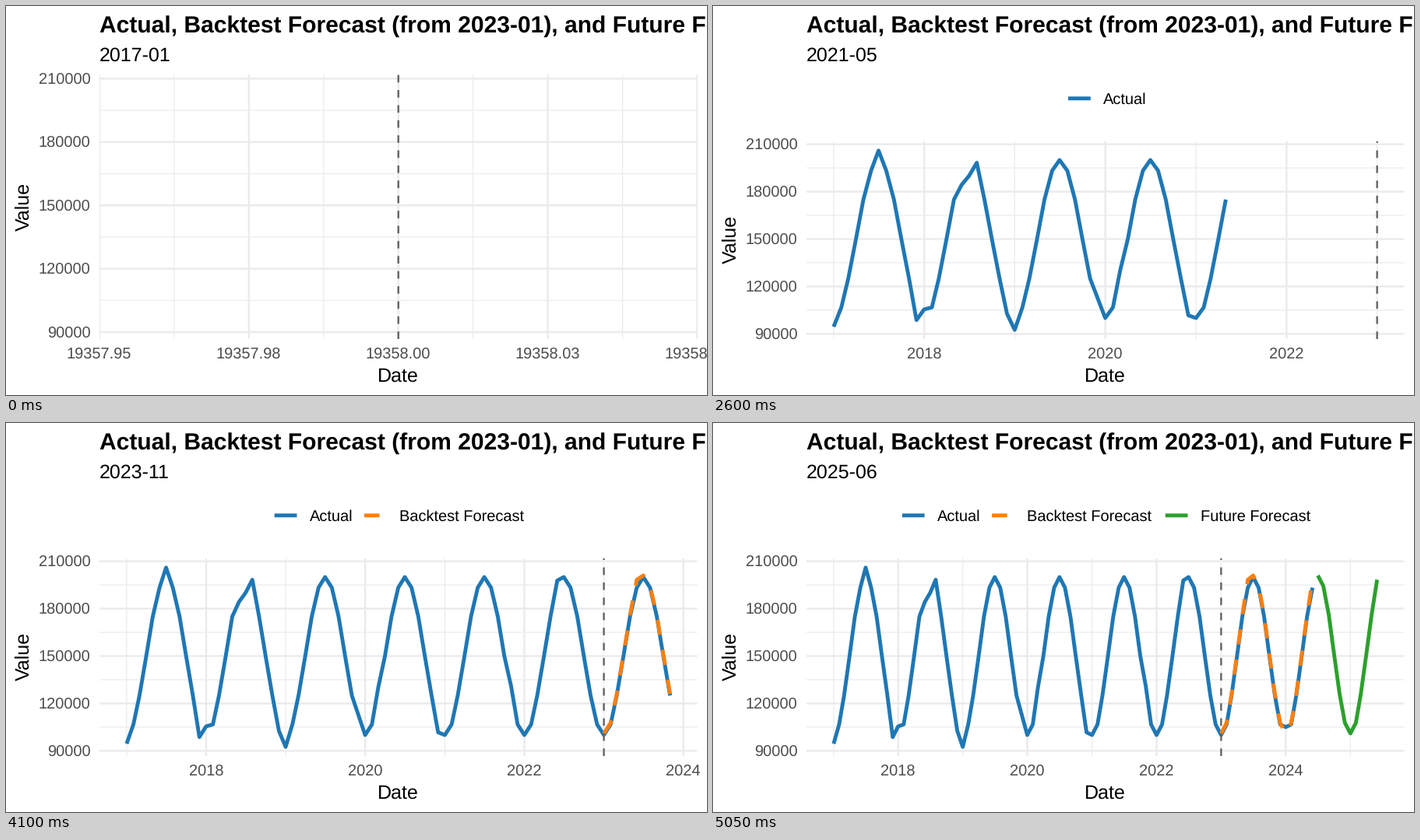
Write a matplotlib script that moves like this. It is 900x500 px and loops after 5100 ms.

```python
import matplotlib.pyplot as plt
import numpy as np
from matplotlib.animation import FuncAnimation
from matplotlib.patches import Rectangle
from matplotlib.textpath import TextPath

plt.rcParams.update({"font.family": "Liberation Sans", "text.hinting": "none"})

W, H, DPI = 900, 500, 100
PT = 72 / DPI                       # points per pixel
LEFT, RIGHT, BOTTOM = 120, 887.5, 428
MID = (LEFT + RIGHT) / 2
Y_MIN, Y_MAX = 86740, 211860
GRID, AXIS = "#EBEBEB", "#4D4D4D"
LINE, RULE, MAJOR, MINOR = 4.89, 2.424, 2.424, 1.212
KEY, GAP = 36, 12.5                 # legend key width and spacing
DASH = (0, (4, 4))

MONTHS = np.arange("2017-01", "2025-07", dtype="datetime64[M]")
DAYS = MONTHS.astype("datetime64[D]").astype(int)
N = len(MONTHS)
SPLIT, END = 72, 90                 # backtest start, first month without data

# a yearly wave; the measured data strays from it in a few months
wave = 150 - 50 * np.cos(np.arange(N) * np.pi / 6)
STRAY = {
    "2017-01": -5.5, "2017-07": 6, "2017-12": -8, "2018-01": 5.5,
    "2018-06": -9, "2018-07": -10, "2018-08": 5, "2018-12": -4,
    "2019-01": -7.5, "2019-12": 6, "2020-03": 5, "2020-12": -5,
    "2021-11": 6, "2022-06": 4.5, "2024-01": 5,
}
actual = wave + [STRAY.get(str(m), 0) for m in MONTHS]
forecast = wave + 1 + 4 * (np.arange(N) % 12 == 5)

# label, colour, line style, months covered, values in thousands
SERIES = [
    ("Actual", "#1F77B4", "-", 0, END, actual),
    ("Backtest Forecast", "#FF7F0E", DASH, SPLIT, END, forecast),
    ("Future Forecast", "#2CA02C", "-", END, N, forecast),
]

fig = plt.figure(figsize=(W / DPI, H / DPI), dpi=DPI, facecolor="white")
ax = fig.add_axes([0, 0, 1, 1])


def advance(s, size):
    box = TextPath((0, 0), s, size=size).get_extents()
    return box.x0 + box.x1


def text(x, y, s, size, align=0, color="black", rotation=0, **kw):
    """Draw s with its pen width aligned: 0 left, 0.5 centre, 1 right."""
    shift = align * advance(s, size) if align else 0
    if rotation:
        y += shift
    else:
        x -= shift
    ax.text(x, y, s, fontsize=size * PT, ha="left", va="baseline", color=color,
            rotation=rotation, rotation_mode="anchor", **kw)


def line(xs, ys, color, width, style="-", clip=None):
    ln, = ax.plot(xs, ys, color=color, lw=width * PT, ls=style, snap=False,
                  solid_capstyle="butt", dash_capstyle="butt",
                  solid_joinstyle="round", dash_joinstyle="round")
    if clip is not None:
        ln.set_clip_path(clip)


def legend(shown):
    widths = [KEY + GAP + advance(s[0], 20) for s in shown]
    x = MID - (sum(widths) + GAP * (len(shown) - 1)) / 2
    for (label, color, style, *_), width in zip(shown, widths):
        line([x + 0.1 * KEY, x + 0.9 * KEY], [118.8, 118.8], color, LINE, style)
        text(x + KEY + GAP, 126, label, 20)
        x += width + GAP


def draw(i):
    ax.clear()
    ax.set(xlim=(0, W), ylim=(H, 0))
    ax.axis("off")

    # a series needs two points before it appears
    shown = [s for s in SERIES if i > s[3]]
    top = 173.9 if shown else 88.3
    panel = Rectangle((LEFT, top), RIGHT - LEFT, BOTTOM - top, fc="none", ec="none")
    ax.add_patch(panel)

    if shown:
        last = max(min(i, s[4] - 1) for s in shown)
        lo, hi = DAYS[0], DAYS[max(last, SPLIT)]
        pad = 0.05 * (hi - lo)
        majors = [(d, str(m)[:4]) for d, m in zip(DAYS[12::24], MONTHS[12::24])
                  if d <= hi + pad]
        minors = [d for d in DAYS[::24] if d <= hi + 0.6 * pad]
    else:
        lo = hi = DAYS[SPLIT]
        pad = 0.05
        ticks = lo + np.linspace(-pad, pad, 9)
        majors = [(d, f"{d + 1e-6:.2f}") for d in ticks[::2]]
        minors = ticks[1::2]

    def px(d):
        return LEFT + (RIGHT - LEFT) * (d - lo + pad) / (hi - lo + 2 * pad)

    def py(v):
        return BOTTOM - (BOTTOM - top) * (v - Y_MIN) / (Y_MAX - Y_MIN)

    for v in range(105000, 200000, 30000):
        line([LEFT, RIGHT], [py(v)] * 2, GRID, MINOR, clip=panel)
    for d in minors:
        line([px(d)] * 2, [top, BOTTOM], GRID, MINOR, clip=panel)
    for v in range(90000, 220000, 30000):
        line([LEFT, RIGHT], [py(v)] * 2, GRID, MAJOR, clip=panel)
        text(108.5, py(v) + 7.2, str(v), 20, 1, AXIS)
    for d, name in majors:
        line([px(d)] * 2, [top, BOTTOM], GRID, MAJOR, clip=panel)
        text(px(d), 454, name, 20, 0.5, AXIS)

    for _, color, style, first, stop, values in shown:
        part = slice(first, min(i + 1, stop))
        line(px(DAYS[part]), py(1000 * values[part]), color, LINE, style, panel)
    line([px(DAYS[SPLIT])] * 2, [BOTTOM, top], "#666666", RULE, DASH, panel)

    legend(shown)
    text(LEFT, 34, "Actual, Backtest Forecast (from 2023-01), and Future Forecast",
         30, weight="bold")
    text(LEFT, 71, str(MONTHS[i]), 25)
    text(MID, 483, "Date", 25, 0.5)
    text(30, (top + BOTTOM) / 2, "Value", 25, 0.5, rotation=90)


anim = FuncAnimation(fig, draw, frames=N, interval=50, repeat=True)
plt.show()
```
